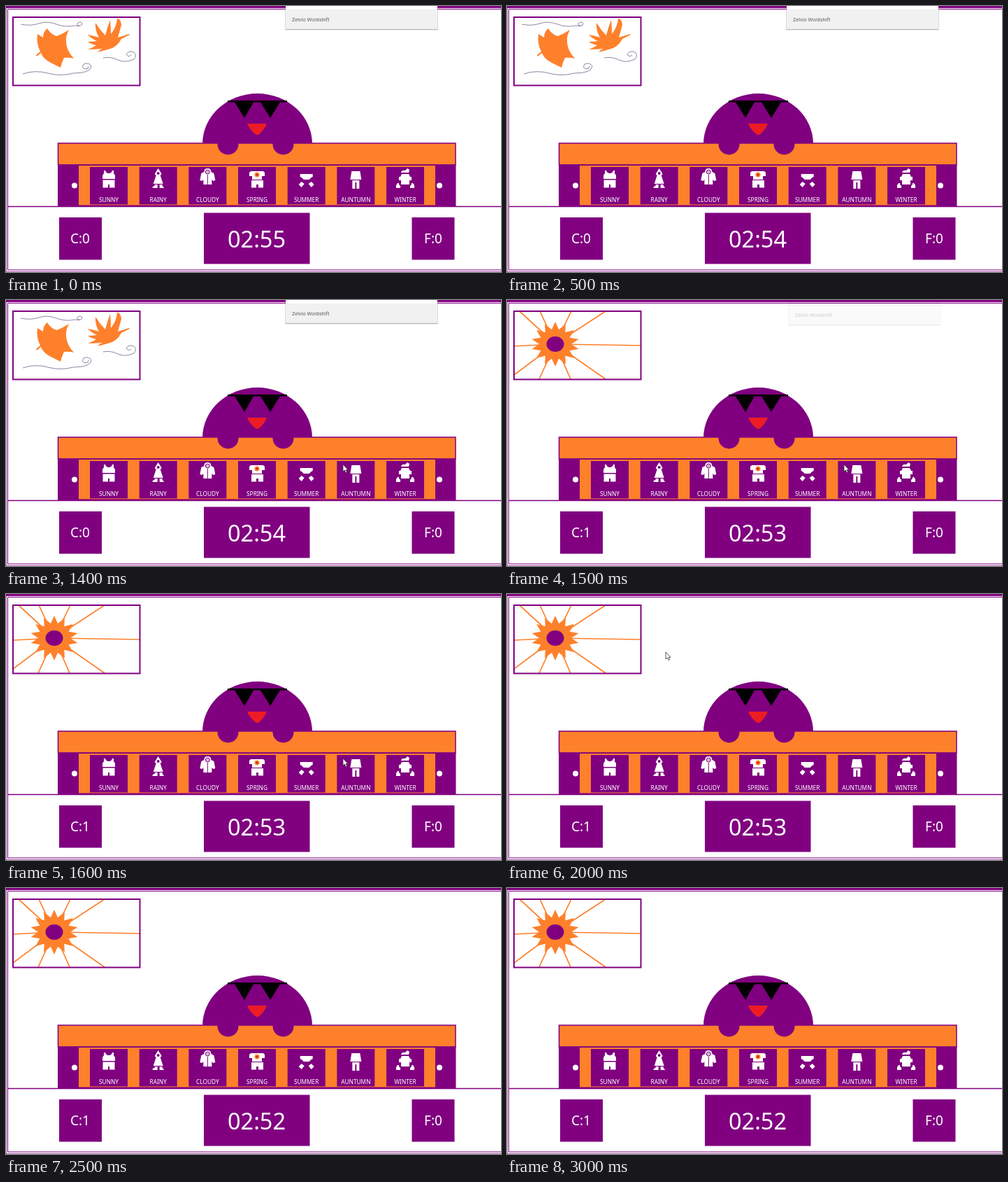
Write an HTML page that moves like this. It is 708 by 380 pixels and loops after 3100 ms.

```html
<!DOCTYPE html>
<html lang="en">
<head>
<meta charset="utf-8">
<title>Weather wardrobe</title>
<style>
  html, body { margin: 0; width: 100%; height: 100%; overflow: hidden; background: #fff; }
  svg { display: block; width: 708px; height: 380px; }
  text { font-family: "Noto Sans", sans-serif; font-weight: 500; fill: #fff; text-anchor: middle; }
  .label { font-size: 8.3px; }
  .score { font-size: 19px; }
  .clock { font-size: 32.5px; }
  .popup { font: 7.4px Roboto, sans-serif; fill: #606060; text-anchor: start; }
  .purple { fill: #800080; }
  .orange { fill: #fe802b; }
  .white { fill: #fff; }
  .outline { fill: none; stroke: #800080; }
  .wind { fill: none; stroke: #4a3068; stroke-width: .6; }
</style>
</head>
<body>
<svg viewBox="0 0 708 380">
  <defs>
    <clipPath id="window"><rect x="10" y="16" width="181" height="97"/></clipPath>
  </defs>

  <!-- page border -->
  <path class="purple" d="M0 0H708V3H0Z"/>
  <path class="outline" d="M708 4.5H2.5V377H708"/>
  <path class="outline" d="M.5 0V379.5H708" stroke-opacity=".6"/>
  <path class="outline" d="M3 286.5H708" stroke-width="1.5"/>

  <!-- weather window -->
  <g id="leaves">
    <path class="orange" d="M43 70L49 65Q43 54 45 40L53 45Q53 37 59 32Q64 41 73 43Q81 40 90 34Q85 43 86 51Q86 63 97 75Q89 73 83 74Q80 80 78 88Q70 84 62 80Q53 75 50 67L44 72Z"/>
    <path class="orange" d="M177 41L165 47Q158 60 146 62L131 66Q134 62 138 61Q127 62 117 62Q125 59 129 56Q122 55 117 51Q125 51 130 50Q121 46 117 41Q127 43 133 45Q127 35 128 24Q134 34 142 42Q145 30 149 20Q150 30 150 40Q158 30 159 18Q164 18 165 27Q162 38 160 45L176 40Z"/>
    <path class="wind" d="M21 26Q35 29 47 25T72 26T98 28Q109 30 109 25Q106 21 102 25Q101 28 105 28"/>
    <path class="wind" d="M24 97Q42 91 60 96T96 96Q121 96 122 86Q119 80 111 83Q107 89 114 90Q118 90 118 86"/>
    <path class="wind" d="M139 74Q150 72 160 77T183 76Q188 71 183 66Q175 63 172 69Q175 74 179 70"/>
  </g>
  <g id="sun" clip-path="url(#window)">
    <path d="M69 63L18 16M69 63L47 16M69 63L92 16M69 63L141 16M69 63L191 65M69 63L141 113M69 63L91 113M69 63L46 113M69 63L10 107M69 63L10 66" stroke="#fe802b" stroke-width="1.7"/>
    <polygon id="star" class="orange"/>
    <ellipse class="purple" cx="69" cy="63" rx="12.5" ry="11"/>
  </g>
  <rect class="outline" x="10" y="16" width="181.5" height="97.5" stroke-width="2"/>

  <!-- character and desk -->
  <path class="purple" d="M281 197A78.5 72 0 0 1 438 197Z"/>
  <path d="M317 135H402V137.5H392L378 160L364 137.5H354L341 160L327 137.5H317Z"/>
  <path d="M345 168H373Q369 178 361 184H358Q349 178 345 168Z" fill="#ed1c24"/>
  <rect class="orange" x="74.5" y="196" width="568.5" height="31" stroke="#800080" stroke-width="1.5"/>
  <circle class="purple" cx="317.5" cy="197.5" r="15"/>
  <circle class="purple" cx="396.5" cy="197.5" r="15"/>
  <rect class="purple" x="74" y="226.5" width="569.5" height="60"/>
  <rect class="orange" x="104" y="228" width="510" height="56.5"/>
  <circle class="white" cx="98" cy="256.5" r="4"/>
  <circle class="white" cx="620" cy="256.5" r="4"/>
  <g id="tiles"></g>

  <!-- counters -->
  <path class="purple" d="M76 302h61v60.5h-61zM283 295.5h151.500v73h-151.500zM580.500 302h61v60.500h-61z"/>
  <text id="correct" class="score" x="106" y="339"></text>
  <text id="clock" class="clock" x="358.5" y="345"></text>
  <text class="score" x="611" y="339">F:0</text>

  <g id="popup">
    <path d="M399 0H618V34.5H399Z" fill="#000" opacity=".14"/>
    <path id="popupTop" class="white" d="M400 0H617V6H400Z"/>
    <path d="M400 5H617V33H400Z" fill="#f1f1f1"/>
    <path d="M400 33.5H617" stroke="#b5b5b5"/>
    <text class="popup" x="409" y="22">Zelvio Wordshift</text>
  </g>
  <path id="cursor" d="M0 0V10L2.300 8L4 11.500L5.700 10.700L4.100 7.400H7Z" fill="#fff" stroke="#333" stroke-width=".8"/>
</svg>
<script>
  const LOOP = 3100;
  const $ = id => document.getElementById(id);

  // Icon paths are relative to the tile's top left corner.
  const outfits = [
    ["SUNNY", "M20 5H22Q23 9 27 9T32 5H34V9L36 12V17H18V12L20 9ZM18.500 18.500H35.500V29.500H28V25H26V29.500H18.500Z"],
    ["RAINY", "M27 2L32 10L30 12L34 24H20L24 12L22 10ZM22 25H26V30H19V28L22 27ZM29 25H33V27L35 29V30H29Z"],
    ["CLOUDY", "M22 7Q22 2 27 2T32 7L36 9L38 19L35 20L33 18V25H21V18L19 20L16 19L18 9Z"],
    ["SPRING", "M18 6H36L38 8V13H34V18H20V13H16V8ZM19 19H36V29.500H29V25H26V29.500H19Z"],
    ["SUMMER", "M18 10H36V14Q33 15 31 18H23Q21 15 18 14ZM16 25L20 21L24 24L20 29ZM30 24L34 21L38 25L34 29Z"],
    ["AUNTUMN", "M21 6H33L35 18H19ZM22 19H32V31H28V22H26V31H22Z"],
    ["WINTER", "M21 8Q22 4 27 5L30 2L33 4L32 8ZM22 10H32L34 14H36V19H33V25H21V19H18V14H20ZM16 23H18V25L20 27V30H14V26ZM36 23H38L40 26V30H34V27L36 25Z"]
  ];
  const details = {
    RAINY: `<circle class="purple" cx="27" cy="9" r="2"/>`,
    CLOUDY: `<circle cx="27" cy="7" r="3" fill="#d9b8d9" stroke="#800080"/><path class="outline" d="M27 11V25"/>`,
    SPRING: `<circle class="orange" cx="27" cy="11" r="3.5"/><circle cx="27" cy="11" r="1.6" fill="#c02020"/>`
  };

  $("tiles").innerHTML = outfits.map(([name, shape], i) => `
    <g transform="translate(${120 + i * 70.67} 230)">
      <rect class="purple" width="54" height="53.5"/>
      <path class="white" d="${shape}"/>${details[name] || ""}
      <text class="label" x="27" y="50">${name}</text>
    </g>`).join("");

  const SPIKES = 14;
  $("star").setAttribute("points", Array.from({ length: SPIKES * 2 }, (_, i) => {
    const angle = i * Math.PI / SPIKES, radius = i % 2 ? 22 : 33;
    return [69 + radius * 1.04 * Math.sin(angle), 63 - radius * .97 * Math.cos(angle)];
  }).join(" "));

  const show = (id, visible) => $(id).style.display = visible ? "" : "none";

  function glide(t, begin, end, from, to) {
    const p = Math.min(1, Math.max(0, (t - begin) / (end - begin)));
    const eased = 1 - (1 - p) ** 2;
    return from.map((v, i) => v + (to[i] - v) * eased);
  }

  function draw(t) {
    const answered = t >= 1500;
    show("leaves", !answered);
    show("sun", answered);
    $("correct").textContent = answered ? "C:1" : "C:0";
    $("clock").textContent = "02:" + (55 - Math.floor((t + 500) / 1000));

    show("popup", t < 1600);
    show("popupTop", !answered);
    $("popup").setAttribute("opacity", answered ? .3 : 1);
    $("popup").setAttribute("transform", answered ? "translate(3 2)" : "");

    const [x, y] = t < 1700
      ? glide(t, 1000, 1300, [545, 120], [482, 235])
      : glide(t, 1700, 2000, [482, 235], [227, 83]);
    show("cursor", t >= 1100 && t < 2400);
    $("cursor").setAttribute("transform", `translate(${x} ${y})`);
  }

  const start = performance.now();
  function tick() {
    const t = (performance.now() - start) % LOOP;
    draw(Math.floor(t / 100) * 100);
    requestAnimationFrame(tick);
  }
  tick();
</script>
</body>
</html>
```
